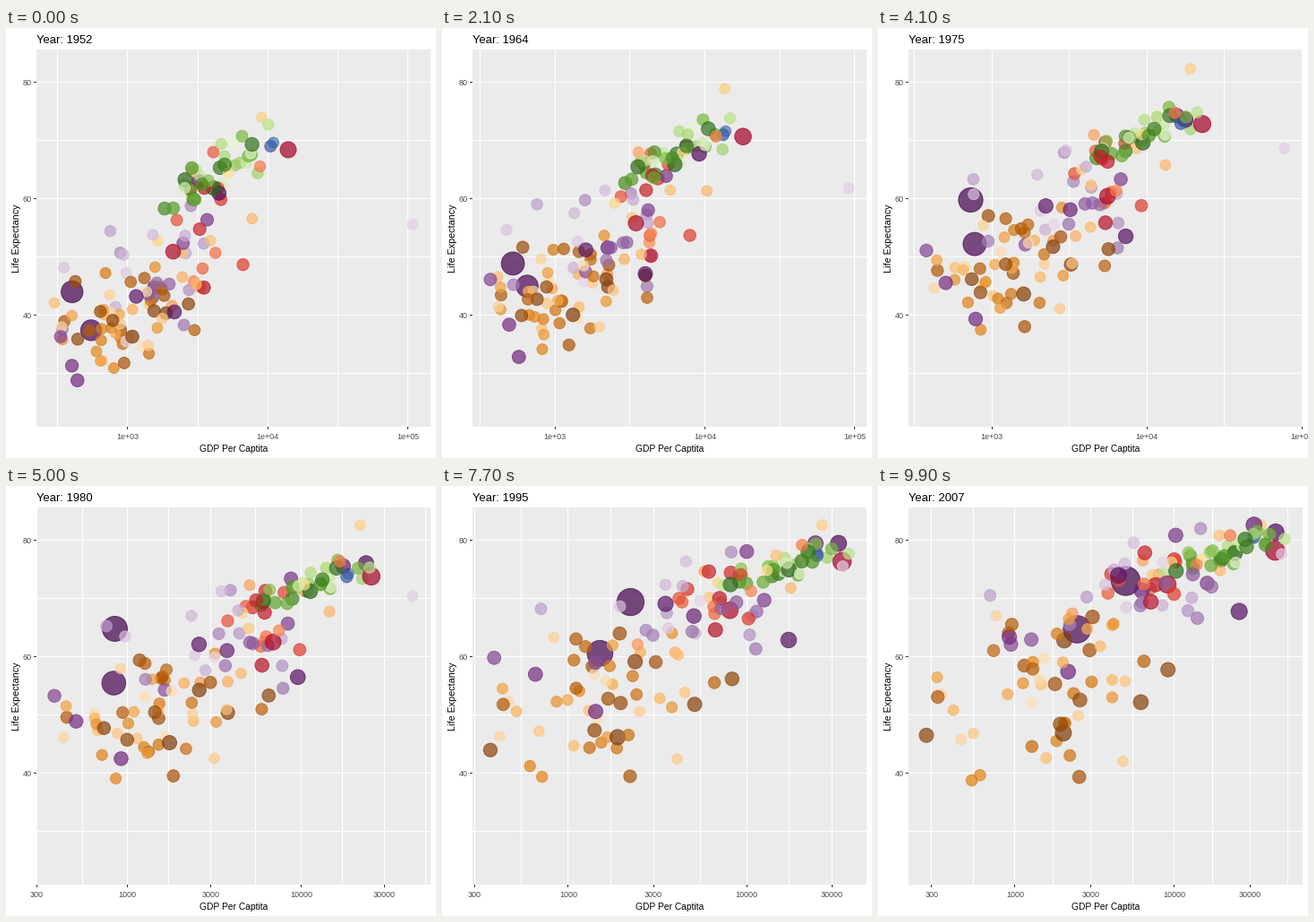
These frames come from a looping animation (480x480 px, 10000 ms). A matplotlib script:

```python
import numpy as np
import matplotlib.pyplot as plt
from matplotlib.animation import FuncAnimation
from matplotlib.collections import LineCollection
from matplotlib.colors import to_rgb
from matplotlib.patches import Rectangle

SIZE, FRAMES, STEP = 480, 100, 100
Y0, YM, Y1 = 1952, 1982, 2007
LEFT, TOP, RIGHT, BOTTOM = 34, 24, 474, 445
PAD = (RIGHT - LEFT) / 22
GREY, DARK = "#4D4D4D", "#333333"

plt.rcParams["font.family"] = ["Liberation Sans"]
rng = np.random.default_rng(12)


class Cloud:
    """Bubbles scattered round a moving centre.

    Each knot holds log income, its spread, life and its spread;
    `tie` is how strongly income and life go together.
    """

    def __init__(self, n, stops, top, fall, growth, tie, *knots):
        rgb = np.array([to_rgb("#" + s) for s in stops.split()])
        at = np.linspace(0, len(rgb) - 1, n)
        self.colors = np.array([np.interp(at, range(len(rgb)), c) for c in rgb.T]).T
        self.people = top * np.exp(-fall * np.arange(n))
        self.growth = np.full(n, growth)
        self.tie = tie
        self.knots = np.array(knots).T
        self.noise = rng.normal(size=(4, n)).clip(-1.9, 1.9)

    def at(self, year):
        income, dx, life, dy = (np.interp(year, (Y0, YM, Y1), k) for k in self.knots)
        # Slowly turning mixtures let bubbles overtake each other.
        turn = .9 * (year - Y0) / (Y1 - Y0)
        a, b, c, d = self.noise
        wealth = a * np.cos(turn) + b * np.sin(turn)
        other = c * np.cos(turn) + d * np.sin(turn)
        health = self.tie * wealth + np.sqrt(1 - self.tie ** 2) * other
        return income + dx * wealth, life + dy * health


clouds = [
    Cloud(52, "7F3B08 B35806 E08214 FDB863 FEE0B6", 110, .115, 3.9, .35,
          (2.98, .28, 39.2, 5), (3.2, .33, 51.3, 6), (3.22, .4, 54.8, 8.5)),
    Cloud(25, "A50026 D73027 F46D43 FDAE61 FEE090", 120, .2, 2.2, .65,
          (3.52, .23, 53.3, 9), (3.8, .22, 66.4, 6), (3.89, .26, 73.6, 4)),
    Cloud(33, "40004B 762A83 9970AB C2A5CF E7D4E8", 210, .13, 2.6, .65,
          (3.13, .33, 46.3, 9), (3.54, .42, 62.8, 8), (3.75, .46, 71, 6.5)),
    Cloud(30, "276419 4D9221 7FBC41 B8E186 E6F5D0", 90, .14, 1.25, .85,
          (3.7, .23, 65, 5), (4.11, .18, 72.8, 2.6), (4.36, .21, 77.8, 2.2)),
    Cloud(2, "3B5AA4 4575B4", 20, 1.6, 2.2, .65,
          (4.01, .02, 69.2, .3), (4.27, .02, 74.3, .4), (4.47, .05, 80.6, .5))]
AFRICA, AMERICAS, ASIA, EUROPE, _ = range(5)

# Leading and outermost bubbles: cloud, rank, millions, (year, income, life) points.
leaders = [
    (ASIA, 0, 1319, [(Y0, 400, 44), (1964, 528, 49), (1980, 850, 65), (Y1, 4959, 73)]),
    (ASIA, 1, 1110, [(Y0, 547, 37.4), (1980, 835, 55.6), (Y1, 2452, 64.7)]),
    (ASIA, 5, 127, [(Y0, 3217, 63), (1973, 15000, 73.8), (Y1, 31656, 82.6)]),
    (ASIA, 11, 48, [(Y0, 331, 36.3), (1964, 372, 46.4), (1995, 385, 59.9), (Y1, 944, 62.1)]),
    (ASIA, 31, 3, [(Y0, 108382, 55.6), (1964, 90500, 62), (1972, 109348, 67.7),
                   (1979, 46000, 70), (1987, 28118, 74.2), (Y1, 47307, 77.6)]),
    (AMERICAS, 0, 301, [(Y0, 13990, 68.4), (1986, 28900, 75), (Y1, 42952, 78.2)]),
    (AMERICAS, 1, 190, [(Y0, 2109, 50.9), (1980, 6950, 62.6), (Y1, 9066, 72.4)]),
    (EUROPE, 22, 5, [(Y0, 10095, 72.7), (1986, 30300, 75.9), (Y1, 49357, 80.2)]),
    (AFRICA, 0, 135, [(Y0, 1077, 36.3), (1980, 1750, 45.3), (Y1, 2014, 46.9)]),
    (AFRICA, 3, 65, [(Y0, 781, 39.1), (1980, 730, 47.8), (1995, 363, 43.9), (Y1, 278, 46.5)]),
    (AFRICA, 40, 2, [(Y0, 299, 42.1), (1970, 497, 49), (Y1, 1569, 42.6)])]

starts = np.cumsum([0] + [len(c.people) for c in clouds])
colors = np.vstack([c.colors for c in clouds])
people = np.concatenate([c.people for c in clouds])
growth = np.concatenate([c.growth for c in clouds])
margin = rng.uniform(.02, .15, len(people))
lead = np.array([starts[c] + rank for c, rank, *_ in leaders])
people[lead] = [m for *_, m, _ in leaders]
paths = [np.array(points).T for *_, points in leaders]

# The two giants lie at the back, the rest in mixed order.
order = rng.permutation(len(people))
order = order[np.argsort(people[order] < 1000, kind="stable")]


def place(year):
    income, life = np.hstack([c.at(year) for c in clouds])
    top = np.array([np.interp(year, p[0], np.log10(p[1])) for p in paths])
    income = np.clip(income, top.min() + margin, top.max() - margin)
    income[lead] = top
    life[lead] = [np.interp(year, p[0], p[2]) for p in paths]
    return income, life.clip(28.8, 82.6)


def life_y(life):
    return 60.5 + (80 - life) * 6.5


def breaks(lo, hi):
    """Major and minor marks on the log axis, with labels."""
    major = [v for v in range(2, 6) if lo <= v <= hi]
    if len(major) < 3:
        marks = [k + d for k in range(2, 5) for d in (0, np.log10(3))]
        major = [v for v in marks if lo <= v <= hi]
    sci = major[-1] >= 5
    names = [f"1e+{v:02d}" if sci else f"{10 ** v:.0f}" for v in major]
    ext = [2 * major[0] - major[1], *major, 2 * major[-1] - major[-2]]
    minor = [*ext, *((p + q) / 2 for p, q in zip(ext, ext[1:]))]
    return major, names, [v for v in minor if lo <= v <= hi]


def lines(color):
    return ax.add_collection(LineCollection([], colors=color, linewidths=1, zorder=1, snap=False))


fig = plt.figure(figsize=(SIZE / 72, SIZE / 72), dpi=72, facecolor="white")
ax = fig.add_axes([0, 0, 1, 1])
ax.set(xlim=(0, SIZE), ylim=(SIZE, 0))
ax.axis("off")
ax.add_patch(Rectangle((LEFT, TOP), RIGHT - LEFT, BOTTOM - TOP, fc="#EBEBEB", lw=0, zorder=0))

rows = [life_y(v) for v in range(30, 81, 10)]
lines("white").set_segments([[(LEFT, y), (RIGHT, y)] for y in rows])
lines(DARK).set_segments([[(LEFT - 3, y), (LEFT, y)] for y in rows[1::2]])
for v in (40, 60, 80):
    ax.text(29, life_y(v) + .5, str(v), size=9, color=GREY, ha="right", va="center_baseline")

grid, ticks = lines("white"), lines(DARK)
labels = [ax.text(0, 459, "", size=9, color=GREY, ha="center") for _ in range(6)]
title = ax.text(34, 17, "", size=13)
ax.text(254, 473, "GDP Per Captita", size=10.2, ha="center")
ax.text(12, 234.5, "Life Expectancy", size=10.8, rotation=90, ha="center", va="center")

rgba = np.column_stack([colors, np.full(len(people), .7)])[order]
dots = ax.scatter(*np.zeros((2, len(people))), facecolors=rgba, edgecolors=rgba,
                  linewidths=1, zorder=3)


def draw(i):
    year = Y0 + (Y1 - Y0) * i / (FRAMES - 1)
    income, life = place(year)

    # The income axis always fits the current spread of bubbles.
    lo, hi = income.min(), income.max()
    scale = (RIGHT - LEFT - 2 * PAD) / (hi - lo)
    to_x = lambda v: LEFT + PAD + (v - lo) * scale
    pixel = lambda v: np.floor(to_x(v)) + .5
    major, names, minor = breaks(lo - PAD / scale, hi + PAD / scale)

    dots.set_offsets(np.column_stack([to_x(income), life_y(life)])[order])
    pop = people * growth ** ((year - Y1) / (Y1 - Y0))
    radius = 5.6 + 10.6 * np.sqrt(pop / 1319)
    dots.set_sizes((2 * radius[order]) ** 2)

    grid.set_segments([[(pixel(v), TOP), (pixel(v), BOTTOM)] for v in minor])
    ticks.set_segments([[(pixel(v), BOTTOM), (pixel(v), BOTTOM + 3)] for v in major])
    for label in labels:
        label.set_text("")
    for label, v, name in zip(labels, major, names):
        label.set(text=name, x=to_x(v))
    title.set_text(f"Year: {round(year)}")
    return dots, grid, ticks, title, *labels


anim = FuncAnimation(fig, draw, frames=FRAMES, interval=STEP, repeat=True, repeat_delay=0)
plt.show()
```
